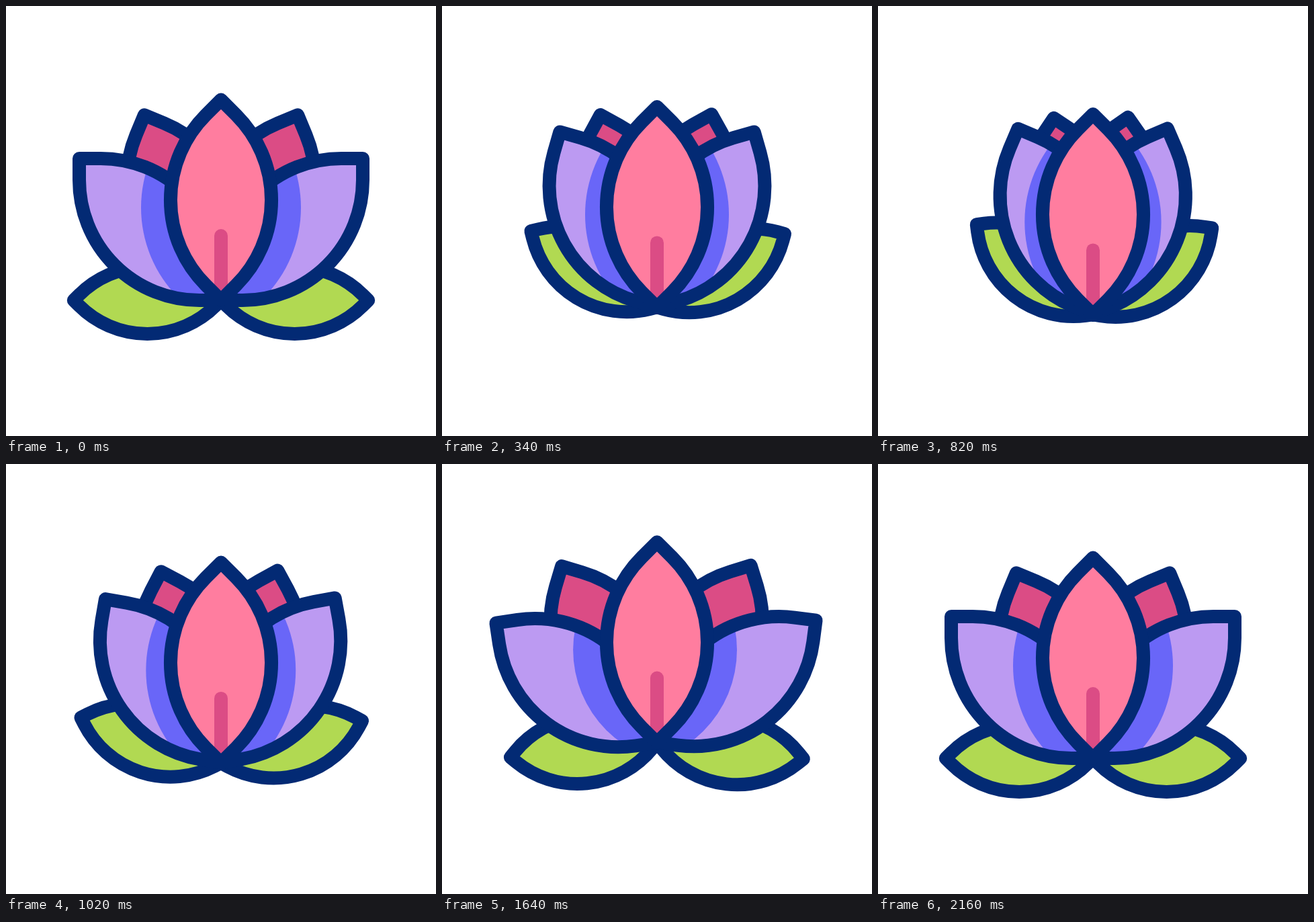
An HTML page with a canvas that plays this animation: 640x640 px, repeating every 2.4 s.

```html
<!DOCTYPE html>
<html lang="en">
<head>
<meta charset="utf-8">
<title>Lotus</title>
<style>
  html, body { margin: 0; width: 100%; height: 100%; overflow: hidden; background: #fff; }
  canvas { display: block; width: 640px; height: 640px; }
</style>
</head>
<body>
<canvas id="stage"></canvas>
<script>
const LOOP = 2400, STEP = 20, REST = 2160;
const NAVY = '#032a74', PINK = '#ff7d9f', ROSE = '#db4c85';
const LILAC = '#bc9af2', INDIGO = '#6966f8', GREEN = '#b1d952';

const canvas = document.getElementById('stage');
const ctx = canvas.getContext('2d');
const ratio = window.devicePixelRatio || 1;
canvas.width = canvas.height = 640 * ratio;

// Petal with its base at the origin and its tip at (-size, -size)
function petalShape(size, flat) {
  const r = size - flat;
  return new Path2D(
    `M0 0H${-flat}A${r} ${r} 0 0 1 ${-size} ${-r}V${-size}` +
    `H${-r}A${r} ${r} 0 0 1 0 ${-flat}Z`);
}
const PETAL = petalShape(211, 32);
const LEAF = petalShape(155, 11);

// Times of the closed and open extremes, then [closed, open] values
const lift = { at: [733, 1485], range: [23.3, -27] };
const leaf = { at: [580, 1400], left: [49.6, -7.5], right: [47.6, -8.3] };
const side = { at: [630, 1430], left: [28.6, -10.5], right: [28.6, -9.3] };
const back = { at: [695, 1465], left: [12.6, -7], right: [13.9, -6.4] };

const smooth = p => p * p * (3 - 2 * p);
const mix = (a, b, p) => a + (b - a) * smooth(p);

function pose(t, [closedAt, openAt], [closed, open]) {
  if (t < closedAt) return mix(0, closed, t / closedAt);
  if (t < openAt) return mix(closed, open, (t - closedAt) / (openAt - closedAt));
  return mix(open, 0, Math.min(1, (t - openAt) / (REST - openAt)));
}

function drawPetal(shape, angle, color, decorate) {
  const turn = (45 - angle) * Math.PI / 180;
  ctx.save();
  ctx.rotate(turn);
  ctx.fillStyle = color;
  ctx.fill(shape);
  if (decorate) {
    ctx.save();
    ctx.clip(shape);
    ctx.rotate(-turn);
    decorate();
    ctx.restore();
  }
  ctx.strokeStyle = NAVY;
  ctx.stroke(shape);
  ctx.restore();
}

// The shade slides inwards as its petal closes
function shade(bend, openSlide) {
  const edge = -119 + bend * (bend > 0 ? 0.75 : openSlide);
  const r = 190 + 2.5 * Math.min(0, bend);
  ctx.fillStyle = INDIGO;
  ctx.beginPath();
  ctx.arc(edge + r, -138, r, 0, Math.PI * 2);
  ctx.fill();
}

function stem() {
  ctx.strokeStyle = ROSE;
  ctx.beginPath();
  ctx.moveTo(0, -96);
  ctx.lineTo(0, 0);
  ctx.stroke();
}

function bothSides(draw) {
  for (const name of ['left', 'right']) {
    ctx.save();
    if (name === 'right') ctx.scale(-1, 1);
    draw(name);
    ctx.restore();
  }
}

function render(t) {
  ctx.setTransform(ratio, 0, 0, ratio, 0, 0);
  ctx.fillStyle = '#fff';
  ctx.fillRect(0, 0, 640, 640);
  ctx.translate(320, 438 + pose(t, lift.at, lift.range));
  ctx.lineWidth = 20;
  ctx.lineJoin = ctx.lineCap = 'round';

  bothSides(name => drawPetal(LEAF, 90 - pose(t, leaf.at, leaf[name]), GREEN));
  bothSides(name => drawPetal(PETAL, 22.5 - pose(t, back.at, back[name]), ROSE));
  bothSides(name => {
    const bend = pose(t, side.at, side[name]);
    drawPetal(PETAL, 45 - bend, LILAC, () => shade(bend, name === 'left' ? 0.7 : 0));
  });
  drawPetal(PETAL, 0, PINK, stem);
}

const start = performance.now();
function tick() {
  const t = (performance.now() - start) % LOOP;
  render(Math.floor(t / STEP) * STEP);
  requestAnimationFrame(tick);
}
tick();
</script>
</body>
</html>
```
